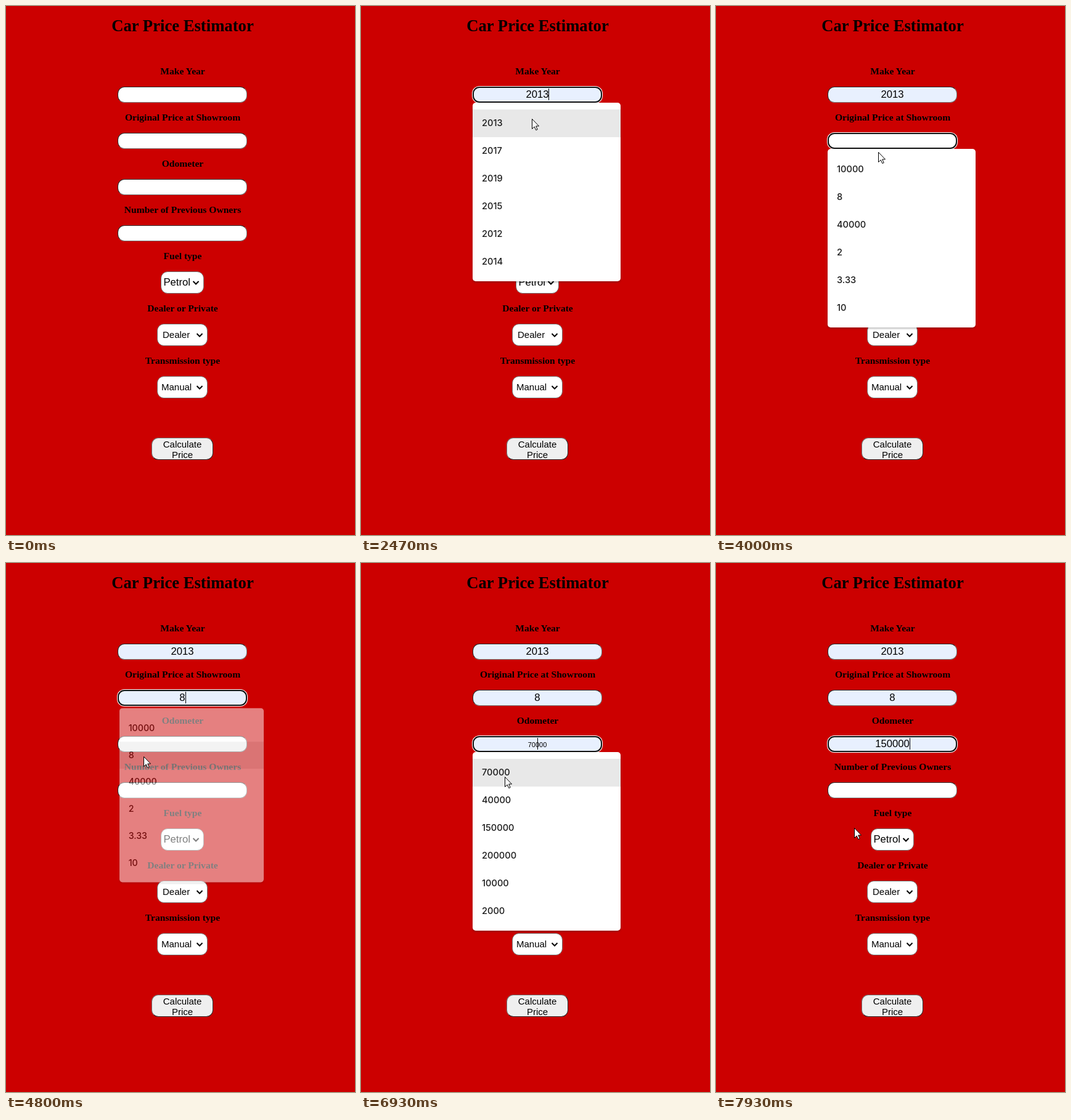
These frames come from a looping animation (566x859 px, 8 s). An HTML page:

```html
<!DOCTYPE html>
<html lang="en">
<head>
<meta charset="utf-8">
<title>Car Price Estimator</title>
<style>
html, body { margin: 0; width: 100%; height: 100%; overflow: hidden; background: #c00; }
#stage { position: relative; width: 566px; height: 859px; overflow: hidden; font-family: "Liberation Sans", Arial, sans-serif; }
#stage > * { position: absolute; box-sizing: border-box; }
.head { left: 0; width: 573px; height: 30px; text-align: center; font: bold 15.6px/30px "Liberation Serif", "Times New Roman", serif; }
.head.title { font-size: 26.67px; }
.field, .select, .button { border: 1px solid #767676; border-radius: 11px; background: #fff; }
.field { left: 181px; width: 210px; height: 26px; border-color: #2b2b2b #767676 #767676 #2b2b2b;
  display: flex; align-items: center; justify-content: center; padding-bottom: 1px; font-size: 16.67px; }
.field.focus { border: 2px solid #101010; box-shadow: 0 0 0 1px #fff; }
.field.filled { background: #e8f0fe; }
.field.preview { font-size: 11px; padding: 1px 0 0; }
.select { height: 36px; font-size: 15px; line-height: 34px; }
.select span { position: absolute; top: 0; }
.select svg { position: absolute; right: 6px; top: 13px; }
.button { left: 236px; top: 701px; width: 100px; height: 36px; background: #efefef; text-align: center;
  font-size: 15px; line-height: 17px; padding-top: 1px; border-color: #767676 #2b2b2b #2b2b2b #767676; }
#panel { left: 181px; width: 240px; height: 290px; padding: 11px 0; border-radius: 5px; background: #fff;
  box-shadow: 0 2px 3px rgba(0,0,0,.25); color: #1b1b1b; font: 500 14.6px/45px Inter, "Open Sans", sans-serif; }
#panel div { height: 45px; padding-left: 15px; }
#panel .hover { background: #e8e8e8; }
#caret { width: 1px; height: 19px; background: #000; }
#cursor { left: 0; top: 0; overflow: visible; }
</style>
</head>
<body>
<div id="stage"></div>
<script>
const stage = document.getElementById('stage');
const add = (html, style = '') => {
  stage.insertAdjacentHTML('beforeend', html);
  stage.lastElementChild.style.cssText = style;
  return stage.lastElementChild;
};
const head = (text, y, cls = '') => add(`<div class="head ${cls}">${text}</div>`, `top:${y - 15}px`);
const select = (text, x, y, w, textX, size) => add(
  `<div class="select"><span>${text}</span><svg width="12" height="9" fill="none" stroke="#000" stroke-width="2"><path d="M1.5 2L6 6.5L10.5 2"/></svg></div>`,
  `left:${x}px;top:${y}px;width:${w}px;font-size:${size}px`).firstChild.style.left = textX + 'px';

head('Car Price Estimator', 32, 'title');
const tops = [131, 206, 281, 356];
const fields = ['Make Year', 'Original Price at Showroom', 'Odometer', 'Number of Previous Owners'].map((label, i) => {
  head(label, tops[i] - 25);
  return add('<div class="field"></div>', `top:${tops[i]}px`);
});
head('Fuel type', 406);
select('Petrol', 251, 431, 70, 3.5, 16.67);
head('Dealer or Private', 491);
select('Dealer', 245, 516, 82, 8, 15);
head('Transmission type', 576);
select('Manual', 245, 601, 82, 6, 15);
add('<div class="button">Calculate<br>Price</div>');

const caret = add('<div id="caret"></div>');
const panel = add('<div id="panel">' + '<div></div>'.repeat(6) + '</div>');
const cursor = add(`<svg id="cursor" width="20" height="20">
  <path fill="#fff" stroke="#000" d="M.5.5V16.5L4.2 13L6.8 18.6L9.2 17.5L6.7 12H11.5Z"/>
  <path fill="none" stroke="#000" d="M-3 -7.5H-1L.5 -7L2 -7.5H4M.5 -7V7M-3 7.5H-1L.5 7L2 7.5H4"/></svg>`);
const [arrow, beam] = cursor.children;

// All times below are in ticks of 1/15 s.
const LOOP = 120;
const sessions = [
  { open: 24, pick: 37, items: ['2013', '2017', '2019', '2015', '2012', '2014'] },
  { open: 51, pick: 71, items: ['10000', '8', '40000', '2', '3.33', '10'] },
  { open: 88, pick: 115, items: ['70000', '40000', '150000', '200000', '10000', '2000'] }
];
const blinks = [24, 32, 37, 46, 51, 60, 67, 80, 87, 96, 104, 112, 115];
const fade = [1, .5, .2, .06];
const path = [
  [6, 556, 735], [9, 480, 430], [12, 385, 150], [14, 335, 25], [17, 294, 144], [25, 294, 144],
  [31, 277, 183], [38, 277, 183], [44, 268, 216], [59, 268, 216], [60, 263, 237], [66, 223, 314],
  [72, 223, 314], [79, 268, 296], [96, 268, 296], [104, 233, 347], [108, 226, 402], [112, 224, 430], [LOOP, 224, 430]
];

function pointer(k) {
  const i = Math.max(1, path.findIndex(p => p[0] >= k));
  const [a, x, y] = path[i - 1], [b, u, v] = path[i], p = (k - a) / (b - a);
  return [Math.round(x + (u - x) * p), Math.round(y + (v - y) * p)];
}
const rowAt = (k, i) => Math.floor((pointer(k)[1] - tops[i] - 37) / 45);

function draw(k) {
  const active = sessions.findLastIndex(s => k >= s.open);
  let menuOpen = false;
  panel.style.opacity = 0;
  fields.forEach((field, i) => {
    const s = sessions[i], on = i === active;
    const row = s && k >= s.open ? rowAt(Math.min(k, s.pick), i) : -1;
    const preview = on && row >= 0 && k < s.pick;
    field.className = 'field' + (on ? ' focus' : '') + (row >= 0 ? ' filled' : '') + (preview ? ' preview' : '');
    field.textContent = row >= 0 ? s.items[row] : '';
    if (!on) return;
    menuOpen = k < s.pick;
    const alpha = fade[Math.max(0, k - s.pick)] || 0;
    panel.style.top = tops[i] + 26 + 'px';
    panel.style.opacity = alpha;
    panel.style.transform = `scale(${.95 + .05 * alpha})`;
    s.items.forEach((text, n) => {
      panel.children[n].textContent = text;
      panel.children[n].className = n === row ? 'hover' : '';
    });
    const typed = menuOpen ? 0 : s.items[row].length;
    caret.style.left = Math.round(285.9 + 4.634 * typed) + 'px';
    caret.style.top = tops[i] + 3 + 'px';
  });
  caret.style.opacity = blinks.filter(b => b <= k).length % 2;

  const [x, y] = pointer(k);
  const overField = !(menuOpen && y > tops[active] + 26) && x > 181 && x < 391 && tops.some(t => y >= t && y < t + 26);
  cursor.style.transform = `translate(${x}px,${y}px)`;
  cursor.style.opacity = k < 6 ? 0 : 1;
  arrow.style.display = overField ? 'none' : '';
  beam.style.display = overField ? '' : 'none';
}

const start = performance.now();
function loop() {
  const t = (performance.now() - start) % 8000;
  draw(Math.floor((t + 4) * 15 / 1000) % LOOP);
  requestAnimationFrame(loop);
}
loop();
</script>
</body>
</html>
```
